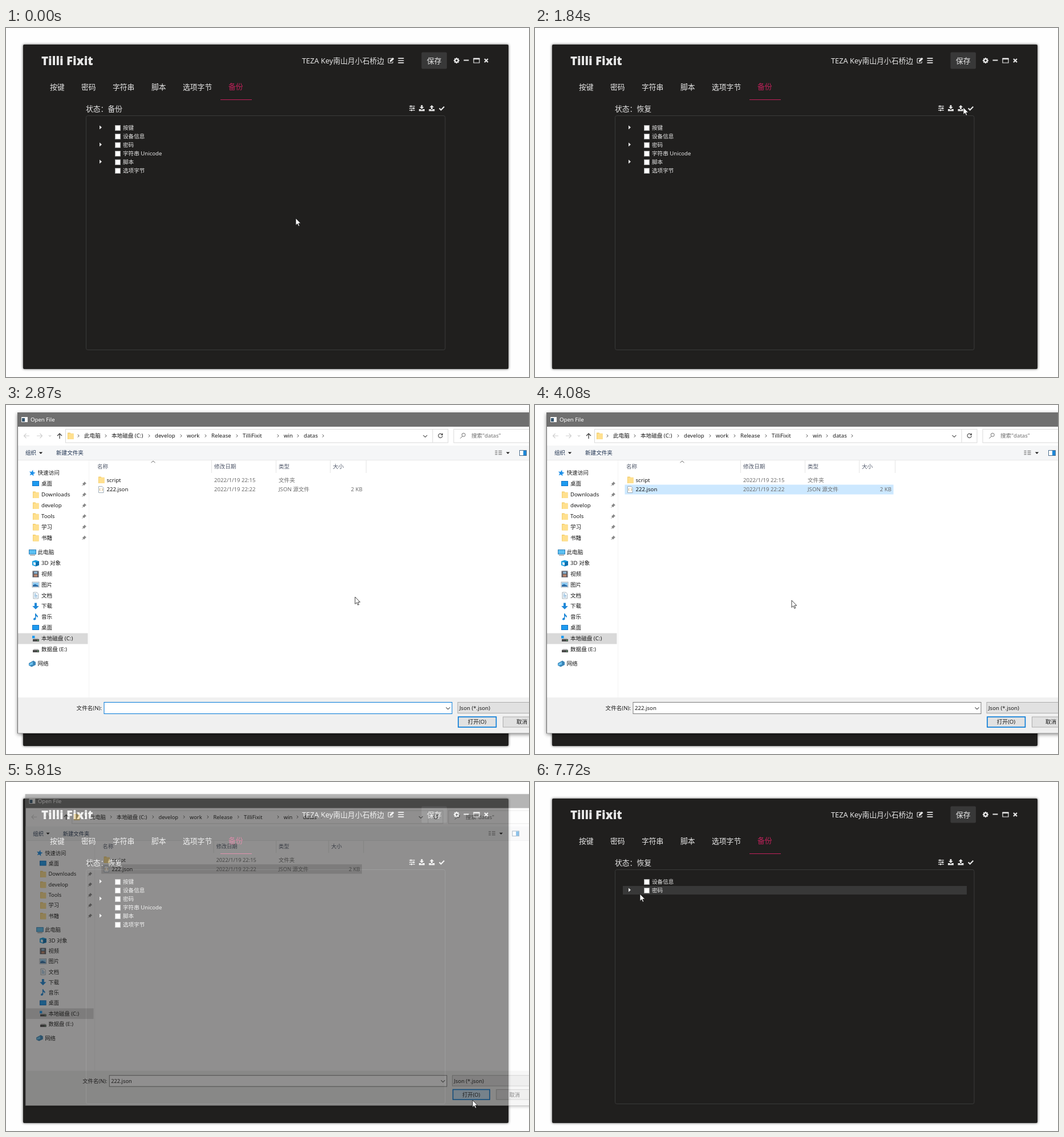
An HTML page for the animation above (8 s loop, 917 by 611 pixels).

```html
<!DOCTYPE html>
<html lang="zh-CN">
<head>
<meta charset="utf-8">
<title>Backup and restore</title>
<style>
html, body { margin: 0; width: 100%; height: 100%; overflow: hidden; background: #fefefe; }
svg { display: block; width: 100%; height: 100%; }
text { font-family: 'Noto Sans', 'Noto Sans CJK SC', sans-serif; white-space: pre; }
.brand { font-family: 'Open Sans', sans-serif; font-weight: 800; font-stretch: 75%; }
.app-shadow { filter: drop-shadow(0 0 2px rgba(0,0,0,.65)); }
.dlg-shadow { filter: drop-shadow(0 2px 3px rgba(0,0,0,.45)); }
</style>
</head>
<body>
<svg id="stage" viewBox="0 0 917 611" xmlns="http://www.w3.org/2000/svg"></svg>
<script>
const LOOP = 8000, STEP = 173, START = 442;
const INK = '#1a1a1a', GREY = '#6d6d6d', BLUE = '#0078d7', LIGHT = '#e6e6e6', PINK = '#c2215b';

// Markup helpers
const rect = (x, y, w, h, fill, more = '') =>
  `<rect x="${x}" y="${y}" width="${w}" height="${h}" fill="${fill}" ${more}/>`;
const path = (d, fill, more = '') => `<path d="${d}" fill="${fill}" ${more}/>`;
const line = (d, color, w = 1, more = '') => path(d, 'none', `stroke="${color}" stroke-width="${w}" ${more}`);
const text = (x, cy, s, fill = INK, size = 9.6, more = '') =>
  `<text x="${x}" y="${cy + size * .36}" font-size="${size}" fill="${fill}" ${more}>${s}</text>`;
const at = (x, y, s) => `<g transform="translate(${x} ${y})">${s}</g>`;
const chevron = (x, y, color = '#555') => line(`M${x - 1.3} ${y - 2.4}l2.5 2.4-2.5 2.4`, color);
const chevronDown = (x, y) => line(`M${x - 3.5} ${y - 1.7}l3.5 3.4 3.5-3.4`, '#555', 1.1);
const arrowDown = (x, y) => path(`M${x - 3.2} ${y - 1.6}h6.4l-3.2 3.4z`, INK);
const folder = (x, cy) => at(x, cy - 6,
  path('M0 .5h4.5l1 1.2H10.5V12H0z', '#f3cd6b') + path('M1 2h9.5v10H1z', '#ffe08f'));

// Icons of the app window
const gear = () => {
  let teeth = '';
  for (let a = 0; a < 360; a += 45) teeth += rect(-1.1, -5, 2.2, 3, LIGHT, `transform="rotate(${a})"`);
  return teeth + `<circle r="2.7" fill="none" stroke="${LIGHT}" stroke-width="2.1"/>`;
};
const tray = path('M-5 1.5h3l2 1.8 2-1.8h3v3.5H-5z', LIGHT);
const sliders = [-3.5, 0, 3.5].map((y, i) =>
  line(`M-5 ${y}H5`, LIGHT, 1.2) + rect([-3, 1.5, -2][i], y - 1.4, 2, 2.8, LIGHT)).join('');

const appIcons =
  at(675, 57, line('M2.5-3.8H-3.8a1 1 0 0 0-1 1V3.2a1 1 0 0 0 1 1H2.2a1 1 0 0 0 1-1V1.5', LIGHT, 1.1) +
    path('M-2 2.2V0L3.3-5.2 5.5-3 .2 2.2z', LIGHT)) +
  at(692.5, 57, line('M-5-3.8H5M-5 0H5M-5 3.8H5', LIGHT, 1.7)) +
  at(790, 57, gear()) +
  at(807, 56.5, line('M-4.5 0h9', LIGHT, 2)) +
  at(825, 57, line('M-5-3.5H5V4H-5z', LIGHT, 1.2) + rect(-5.5, -4.5, 11, 2.6, LIGHT)) +
  at(842, 57, line('M-3-3L3 3M3-3L-3 3', LIGHT, 2.2)) +
  at(712, 140.5, sliders) +
  at(729, 140.5, path('M-1.4-5.5h2.8v3.2h2.4L0 1.4-3.8-2.3h2.4z', LIGHT) + tray) +
  at(746.5, 140.5, path('M-1.4 1.4h2.8v-3.2h2.4L0-5.5-3.8-1.8h2.4z', LIGHT) + tray) +
  at(764, 140.5, line('M-4.3 0L-1.3 3 4.3-2.8', LIGHT, 2.1));

const tabs = [[77, '按键'], [132, '密码'], [187, '字符串'], [255, '脚本'], [310, '选项字节']];
const app =
  rect(30, 29, 851, 568, '#201f1e', 'rx="2" class="app-shadow"') +
  text(62, 57.5, 'Tilli Fixit', LIGHT, 20.5, 'class="brand"') +
  text(519, 57.5, 'TEZA Key南山月小石桥边', LIGHT, 12.8) +
  rect(728.5, 42.5, 44.5, 29, '#383838', 'rx="2"') + text(738, 57.5, '保存', LIGHT, 12.8) +
  tabs.map(([x, s]) => text(x, 103, s, LIGHT, 12.8)).join('') +
  text(390, 102.5, '备份', PINK, 12.8) + rect(376, 125, 55, 1, PINK) +
  rect(140.5, 153.5, 629.5, 410, 'none', 'rx="3" stroke="#3a3a3a"') + appIcons;

// Tree: a leading ">" marks a row that can unfold
const fullTree = ['>按键', '设备信息', '>密码', '字符串 Unicode', '>脚本', '选项字节'];
const shortTree = ['设备信息', '>密码'];
const treeRow = (label, i, [cx, cy]) => {
  const top = 167 + 15 * i, mid = top + 7.5;
  const hot = cx > 154 && cx < 757 && cy >= top && cy < top + 15;
  return (hot ? rect(154, top, 603, 15, '#383838') : '') +
    (label[0] === '>' ? path(`M164 ${mid - 4}l4 3.5-4 3.5z`, LIGHT) : '') +
    rect(191.5, mid - 4, 9, 9, '#fff', 'stroke="#a0a0a0"') + text(205, mid, label.replace('>', ''), LIGHT);
};

// Icons of the file dialog's side list, centred on the origin
const screen = rect(-6, -5, 12, 9, '#1173c7') + rect(-5, -4, 10, 7, '#1e9bf0');
const drive = rect(-5, 1, 11, 4, '#4a4a4a') + path('M-5 1l2-2h7l2 2z', '#bdbdbd') + rect(3, 2.5, 2, 1, '#6fe08a');
const sheet = path('M-4-5.5H2L4.5-3V5.5H-4z', '#fff', 'stroke="#8a9aa8" stroke-width=".8"');
const icons = {
  screen, drive,
  folder: folder(-5, 0),
  star: path('M0-5.5l1.5 3.7 4 .3-3.1 2.5 1 4L0 2.8-3.4 5l1-4-3.1-2.5 4-.3z', '#1e90e8', 'transform="rotate(12)"'),
  pc: rect(-6, -5, 13, 8.5, '#2b7fb8') + rect(-5, -4, 11, 6.5, '#5cc0f2') + rect(-4, 4.5, 9, 1, '#777'),
  cube: path('M-6-3.5L0-5.5 6-3.5V3.5L0 5.5-6 3.5z', '#1b9fe0') + path('M0-1.5L6-3.5V3.5L0 5.5z', '#0c6fae') + path('M-4-2l4 1v4.5l-4-1z', '#e8f6ff'),
  film: rect(-5.5, -5.5, 11, 11, '#3d3d46') + rect(-3, -4.5, 6, 4, '#8fb4d0') + rect(-3, .5, 6, 4, '#c08a70') +
    line('M-4.4-5V5M4.4-5V5', '#ddd', 1, 'stroke-dasharray="1 1"'),
  image: rect(-6, -4.5, 12, 9, '#fff', 'stroke="#8a9aa8" stroke-width=".8"') + rect(-5, -3.5, 10, 7, '#8fcbf2') + path('M-5 3.5V1l4-2 6 3v1.5z', '#2f6fa8'),
  doc: sheet + line('M-2.3-2.5H1M-2.3 0H2.8M-2.3 2.5H2.8', '#4a90c8', 1),
  down: path('M-2-5.5h4V0h3.8L0 5.8-5.8 0H-2z', '#1e88d8'),
  note: path('M-1-6h1.5q.5 2.5 3.5 4.5 0 2-1 3 0-2-2.5-3V3q0 2.5-2.5 2.5T-4 3.5t3-2.3z', '#1e88d8'),
  sysDrive: drive + rect(-6, -5, 4.5, 4.5, '#1e9bf0'),
  net: path('M-6-1L2-5.5 6-3V2L-1 5.5-6 3z', '#3b86b8') + path('M-5 0l6-3.2V1.5L-5 3z', '#6cc3f0')
};
const side = [
  ['star', '快速访问', 119], ['screen', '桌面', 138], ['folder', 'Downloads', 157], ['folder', 'develop', 176],
  ['folder', 'Tools', 195], ['folder', '学习', 213.5], ['folder', '书籍', 232.5], ['pc', '此电脑', 258],
  ['cube', '3D 对象', 277], ['film', '视频', 296], ['image', '图片', 314.5], ['doc', '文档', 333.5],
  ['down', '下载', 352], ['note', '音乐', 371], ['screen', '桌面', 390], ['sysDrive', '本地磁盘 (C:)', 409],
  ['drive', '数据盘 (E:)', 428], ['net', '网络', 453]
];
const heads = ['star', 'pc', 'net'];
const pin = line('M-3.5 3.5L-1 1', '#888', 1) + path('M.5-4L4-.5 2.5 0 1 2 0 3-3 0-2-1 0-2.5z', '#888');
const sideList = rect(21, 399.5, 122.5, 19, '#d9d9d9') + side.map(([icon, label, y]) => {
  const head = heads.includes(icon);
  return at(head ? 46 : 52, y, icons[icon]) + text(head ? 55.5 : 62, y, label) +
    (y > 130 && y < 240 ? at(137, y, pin) : '');
}).join('');

const crumbs = [[137, '此电脑'], [185, '本地磁盘 (C:)'], [261, 'develop'], [317, 'work'], [360, 'Release'],
  [415, 'TilliFixit'], [487, 'win'], [522, 'datas']];
const addressBar =
  line('M41 54H31.5m4-4l-4 4 4 4M54 54h9.5m-4-4l4 4-4 4M75 53l2 2 2-2', '#cfcfcf', 1.1) +
  line('M94 59V50m-4 4l4-4 4 4', '#444', 1.3) +
  rect(104.5, 42.5, 670.5, 23.5, '#fff', 'stroke="#d9d9d9"') + line('M748 43V66', '#d9d9d9') +
  folder(108, 54) + crumbs.map(([x, s]) => chevron(x - 10, 54) + text(x, 54, s)).join('') + chevron(556, 54) +
  chevronDown(735, 54.5) +
  line('M764.5 51.5a3.6 3.6 0 1 0 .8 2.5', '#555', 1.2) + path('M766 49v4h-4z', '#555') +
  rect(785, 42.5, 150, 23.5, '#fff', 'stroke="#d9d9d9"') +
  line('M796.5 58.5l3.7-3.7', GREY) + `<circle cx="802.3" cy="52.3" r="3" fill="none" stroke="${GREY}"/>` +
  text(816, 54, '搜索"datas"', GREY);

const commandBar =
  rect(21, 71, 919, 25.5, '#f5f6f7') + rect(21, 96, 919, 1, '#e8e8e8') +
  text(34, 84, '组织', '#1e3250') + arrowDown(61, 84) + text(88, 84, '新建文件夹', '#1e3250') +
  line('M857.5 80.5h4M857.5 83.5h4M857.5 86.5h4M863.5 80.5h6M863.5 83.5h6M863.5 86.5h6', '#8a8a8a', 1.3) +
  arrowDown(880, 84) +
  rect(900.5, 79.5, 12, 9, '#fff', 'stroke="#4d6f8f"') + rect(907, 80, 5, 8, '#1e88d8');

const columns =
  [[160, '名称'], [365, '修改日期'], [478, '类型'], [573, '大小']].map(([x, s]) => text(x, 107.5, s, '#50586a')).join('') +
  line('M360.5 97V119M473.5 97V119M568.5 97V119M631.5 97V119', '#e5e5e5') +
  line('M254.5 101l3.5-3 3.5 3', '#666') + line('M145.5 97V512', '#f3f3f3');

const files =
  folder(162, 131) + text(176.5, 131.5, 'script') +
  text(365, 131.5, '2022/1/19 22:15', GREY) + text(478, 131.5, '文件夹', GREY) +
  at(166.5, 148, sheet + line('M-1-2q-1 0-1 1T-2.5 0q.5 0 .5 1t1 1M1.5-2q1 0 1 1T3 0q-.5 0-.5 1t-1 1', '#c8963c', .8)) +
  text(176.5, 148, '222.json') + text(365, 148, '2022/1/19 22:22', GREY) +
  text(478, 148, 'JSON 源文件', GREY) + text(625, 148, '2 KB', GREY, 9.6, 'text-anchor="end"');

const dialogBase =
  rect(20, 13, 920, 562, '#fff', 'class="dlg-shadow"') +
  rect(20.5, 13.5, 919, 561, '#fff', 'stroke="#6b6b6b"') + rect(20, 13, 920, 25, '#6f6f6f') +
  rect(27, 21, 11, 9, '#f4f4f4') + rect(28, 23, 5, 6, '#34556f') + text(43, 26, 'Open File', '#fff') +
  addressBar + commandBar + sideList;
const dialogFoot =
  rect(21, 512, 919, 62.5, '#f0f0f0') + text(168, 531, '文件名(N):', INK, 9.6, 'text-anchor="end"') +
  rect(792, 520.5, 150, 19, '#e1e1e1', 'stroke="#adadad"') + text(795, 530.5, 'Json (*.json)') +
  rect(871.5, 546, 70, 18, '#e1e1e1', 'stroke="#adadad"') + text(895, 555, '取消');

// Pointer: first step of each move, then one place per step
const moves = [
  [-9, [508, 333]],
  [0, [522, 321], [608, 264], [700, 196], [743, 154], [778, 77], [751, 139]],
  [12, [738, 170], [668, 285], [612, 336], [508, 285], [372, 212], [222, 152], [205, 148]],
  [19, [215, 162], [292, 225], [450, 342], [628, 455], [762, 532], [812, 555], [818, 557]],
  [37, [800, 541], [690, 456], [500, 345], [320, 255], [214, 207], [184, 196]]
];
const pointerAt = k => {
  const [first, ...spots] = moves.filter(m => m[0] <= k).pop();
  return spots[Math.min(k - first, spots.length - 1)];
};
const pointer = ([x, y]) => at(x, y,
  path('M0 0V12.4L2.9 9.8 4.9 14.2 6.8 13.3 4.9 9.1H8.8Z', '#fff', 'stroke="#111" stroke-width=".8"'));

function dialog(k, spot) {
  // Opening and closing each show one half-faded, slightly shrunk step
  const [alpha, scale] = k === 9 ? [.655, .982] : k === 31 ? [.5, .97] : [1, 1];
  const picked = k >= 19, caret = (k >= 9 && k < 12) || (k >= 15 && k < 18);
  const rowFill = k >= 26 ? '#d9d9d9' : k >= 18 ? '#cce8ff' : k === 17 ? '#e5f3ff' : 'none';
  const over = spot[0] > 792 && spot[1] > 546;
  const openFill = k >= 26 ? '#cce4f7' : over ? '#e5f1fb' : '#e1e1e1';
  return `<g opacity="${alpha}" transform="translate(480 294) scale(${scale}) translate(-480 -294)">` +
    dialogBase + rect(157.5, 139.5, 471, 17, rowFill) + columns + files + dialogFoot +
    rect(172, 520.5, 610, 20, '#fff', `stroke="${picked ? '#7a7a7a' : BLUE}"`) + chevronDown(775, 531) +
    (picked ? text(175, 531, '222.json') : caret ? rect(174.5, 524, 1, 13.5, INK) : '') +
    rect(793, 546, 66.5, 18, openFill, `stroke="${BLUE}" stroke-width="1.6"`) +
    text(826, 555, '打开(O)', INK, 9.6, 'text-anchor="middle"') + '</g>';
}

const stage = document.getElementById('stage');
let shown = null;

function draw(t) {
  const k = Math.max(-1, Math.floor((t - START) / STEP));
  if (k === shown) return;
  shown = k;
  const spot = pointerAt(k);
  const tree = k < 36 ? fullTree : shortTree;
  stage.innerHTML = app + text(140, 141.5, '状态：' + (k < 8 ? '备份' : '恢复'), LIGHT, 12.8) +
    tree.map((s, i) => treeRow(s, i, spot)).join('') +
    (k >= 9 && k < 32 ? dialog(k, spot) : '') + pointer(spot);
}

const begin = performance.now();
function tick() {
  draw((performance.now() - begin) % LOOP);
  requestAnimationFrame(tick);
}
tick();
</script>
</body>
</html>
```
